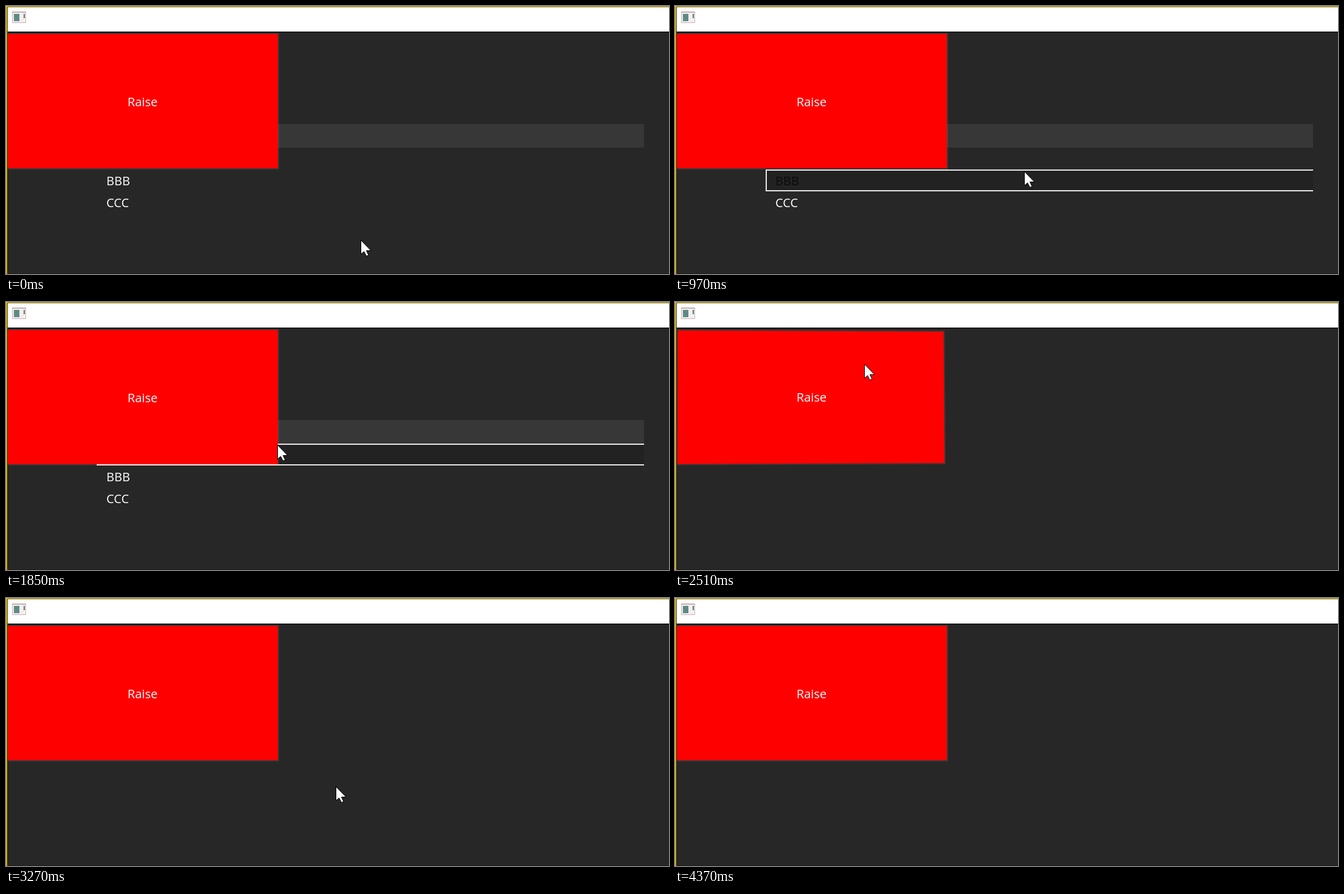
These frames come from a looping animation (1090 by 441 pixels, 4920 ms). An HTML page with a canvas:

```html
<!DOCTYPE html>
<html lang="en">
<head>
<meta charset="utf-8">
<title>Raise button over a list</title>
<style>
html, body { margin: 0; width: 100%; height: 100%; overflow: hidden; background: #272727; }
canvas { display: block; }
</style>
</head>
<body>
<canvas id="stage" width="1090" height="441"></canvas>
<script>
const ctx = document.getElementById('stage').getContext('2d');
const LOOP = 4920;
const LIST = { x: 149, y: 233, w: 900, row: 36, items: ['', 'BBB', 'CCC'] };
const BUTTON = { x: 3, y: 46, w: 444, h: 221 };
const CLOSE_BAR = 20, CLOSE_LIST = 21, HIDE_POINTER = 40;
const ARROW = new Path2D('M0 0V23L5 18.5 9 26 12.5 24.5 9 17H16.5Z');

// Turning points of the pointer: [step, x, y]
const PATH = [
  [0, 584, 386], [2, 597, 405], [5, 598, 371], [7, 600, 306], [11, 550, 240],
  [13, 532, 276], [14, 500, 317], [17, 447, 236], [22, 312, 103], [25, 312, 103],
  [30, 543, 311], [34, 552, 305], [37, 584, 381]
];

const clamp = v => Math.max(0, Math.min(1, v));
const mix = (a, b, p) => a + (b - a) * p;

function pointerAt(step) {
  const next = PATH.findIndex(k => k[0] > step);
  if (next < 0) return PATH.at(-1).slice(1);
  const b = PATH[next], a = PATH[Math.max(0, next - 1)];
  const p = clamp((step - a[0]) / (b[0] - a[0]));
  return [mix(a[1], b[1], p), mix(a[2], b[2], p)];
}

// The picture ticks every 110 ms, with three slightly shorter ticks
function stepAt(t) {
  const short = (t >= 400) + (t >= 600) + (t >= 3000);
  return Math.floor((t + short * 10) / 110);
}

// Hover follows the pointer one step late
function hoveredRow(step) {
  const [x, y] = pointerAt(step - 1);
  const row = Math.floor((y - LIST.y) / LIST.row);
  return step < CLOSE_BAR && x >= 447 && row < LIST.items.length ? row : -1;
}

// A press pulls each corner inwards, more so when near the pointer
function buttonPath(press, [px, py]) {
  const { x, y, w, h } = BUTTON;
  const cx = x + w / 2, cy = y + h / 2, half = Math.hypot(w, h) / 2;
  const path = new Path2D();
  for (const [sx, sy] of [[-1, -1], [1, -1], [1, 1], [-1, 1]]) {
    const dx = sx * w / 2, dy = sy * h / 2;
    const far = Math.hypot(cx + dx - px, cy + dy - py);
    const scale = 1 - press * 10 * clamp(1 - far / 380) / half;
    path.lineTo(cx + dx * scale, cy + dy * scale);
  }
  path.closePath();
  return path;
}

function rect(color, x, y, w, h) {
  ctx.fillStyle = color;
  ctx.fillRect(x, y, w, h);
}

function text(str, x, y, color, align = 'left') {
  ctx.font = '20px "Open Sans", "Noto Sans", sans-serif';
  ctx.textAlign = align;
  ctx.fillStyle = color;
  ctx.fillText(str, x, y);
}

function drawHover(row) {
  const { x, w, row: h } = LIST, y = LIST.y + row * h;
  rect('#e6e6e6', x, y, w, h);
  rect('#222222', x + 2, y + 2, w - 2, h - 4);
}

function drawButton(step, pointer) {
  const press = clamp(Math.min((step - 20) / 3, (26 - step) / 2));
  const shape = buttonPath(press, pointer);
  ctx.strokeStyle = 'rgba(255, 255, 255, 0.08)';
  ctx.lineWidth = 4;
  ctx.stroke(shape);
  ctx.fillStyle = '#ff0000';
  ctx.fill(shape);
  text('Raise', 224.5, 165 - press * 0.7, '#ffffff', 'center');
}

function drawWindow() {
  rect('#ffffff', 3, 2, 1087, 40);
  rect('#181818', 2, 42, 1088, 2);
  rect('#1c1c1c', 2, 440, 1088, 1);
  rect('#5c5332', 2, 1, 1088, 1);
  rect('#5c5332', 2, 1, 1, 41);
  rect('#1c1c1c', 2, 42, 1, 399);
  rect('#d2ab0c', 0, 0, 2, 441);
  rect('#f8d322', 0, 0, 1090, 1);
  // Window icon
  rect('#c3b4b4', 10, 9, 23, 19);
  rect('#f6eeee', 11, 11, 21, 16);
  rect('#5e8c84', 13, 13, 9, 12);
  rect('#56786f', 29, 13, 2, 7);
}

function drawPointer([x, y]) {
  ctx.save();
  ctx.translate(Math.round(x) - 0.5, Math.round(y) - 0.5);
  ctx.fillStyle = '#ffffff';
  ctx.fill(ARROW);
  ctx.strokeStyle = '#000000';
  ctx.lineWidth = 1;
  ctx.stroke(ARROW);
  ctx.restore();
}

function draw(step) {
  const pointer = pointerAt(step), row = hoveredRow(step);
  rect('#272727', 0, 0, 1090, 441);
  if (step < CLOSE_BAR) rect('#373737', 447, 194, 602, 39);
  if (row >= 0) drawHover(row);
  drawButton(step, pointer);
  if (step < CLOSE_LIST) {
    LIST.items.forEach((s, i) =>
      text(s, LIST.x + 16, 259 + i * LIST.row, i === row ? '#0c0c0c' : '#ffffff'));
  }
  drawWindow();
  if (step < HIDE_POINTER) drawPointer(pointer);
}

const start = performance.now();
function tick() {
  draw(stepAt((performance.now() - start) % LOOP));
  requestAnimationFrame(tick);
}
tick();
</script>
</body>
</html>
```
